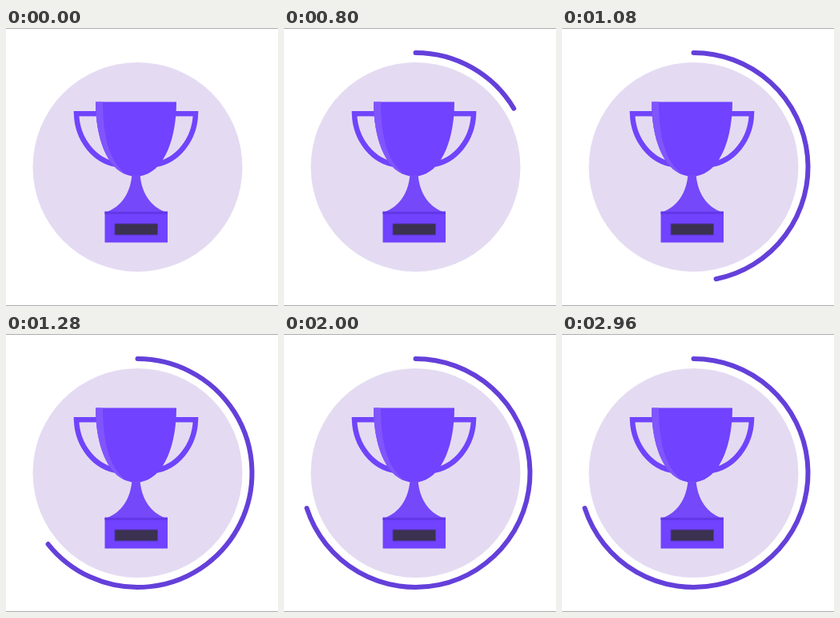
Recreate the animation shown at these times as an HTML page. Size 340 by 348 pixels, loop 3040 ms.

```html
<!DOCTYPE html>
<html lang="en">
<head>
<meta charset="utf-8">
<title>Trophy progress</title>
<style>
  html, body { margin: 0; width: 100%; height: 100%; overflow: hidden; background: #fff; }
  svg { display: block; width: 340px; height: 348px; }
</style>
</head>
<body>
<svg viewBox="0 0 340 348">
  <path d="M0 .5H340M0 347.5H340" stroke="#adadad"/>
  <circle cx="164.5" cy="174" r="131" fill="#e4dbf2"/>

  <g fill="none" stroke="#7044fb" stroke-width="6.5">
    <path d="M115 107.2H88C89 140 111 167 139 171"/>
    <path d="M210 107.2H237C236 140 214 167 186 171"/>
  </g>
  <path d="M112 92.5H213C213 137 199 176 173 184Q162.500 188 152 184C126 176 112 137 112 92.500Z" fill="#7142ff"/>
  <path d="M112 92.500H121C121 137 130 170 152 184C126 176 112 137 112 92.500Z" fill="#8155fd"/>
  <path d="M157.500 184H167.500C170 209 182 223 198 230H127C143 223 155 209 157.500 184Z" fill="#7548fa"/>
  <path d="M123.500 229.500H202V268.500H123.500Z" fill="#7142ff"/>
  <path d="M123.500 231.500H202" stroke="#6337e6" stroke-width="3"/>
  <path d="M136 245H189.500V259H136Z" fill="#3b3150" stroke="#5434b8"/>

  <path id="arc" fill="none" stroke="#6440da" stroke-width="6" stroke-linecap="round"/>
</svg>
<script>
  const LOOP = 3040, APPEAR = 480, START = 488, DURATION = 972;
  const CX = 164.5, CY = 174, RADIUS = 143, SWEEP = 0.7 * 2 * Math.PI;
  const arc = document.getElementById('arc');

  const easeInOutSine = p => (1 - Math.cos(Math.PI * p)) / 2;

  function draw(now) {
    const time = now % LOOP;
    const progress = Math.min(1, Math.max(0, (time - START) / DURATION));
    const angle = Math.max(0.001, SWEEP * easeInOutSine(progress));
    const x = CX + RADIUS * Math.sin(angle);
    const y = CY - RADIUS * Math.cos(angle);
    const large = angle > Math.PI ? 1 : 0;
    arc.setAttribute('d', `M${CX} ${CY - RADIUS}A${RADIUS} ${RADIUS} 0 ${large} 1 ${x} ${y}`);
    arc.style.display = time < APPEAR ? 'none' : '';
  }

  const origin = performance.now();
  function tick() {
    draw(performance.now() - origin);
    requestAnimationFrame(tick);
  }
  tick();
</script>
</body>
</html>
```
